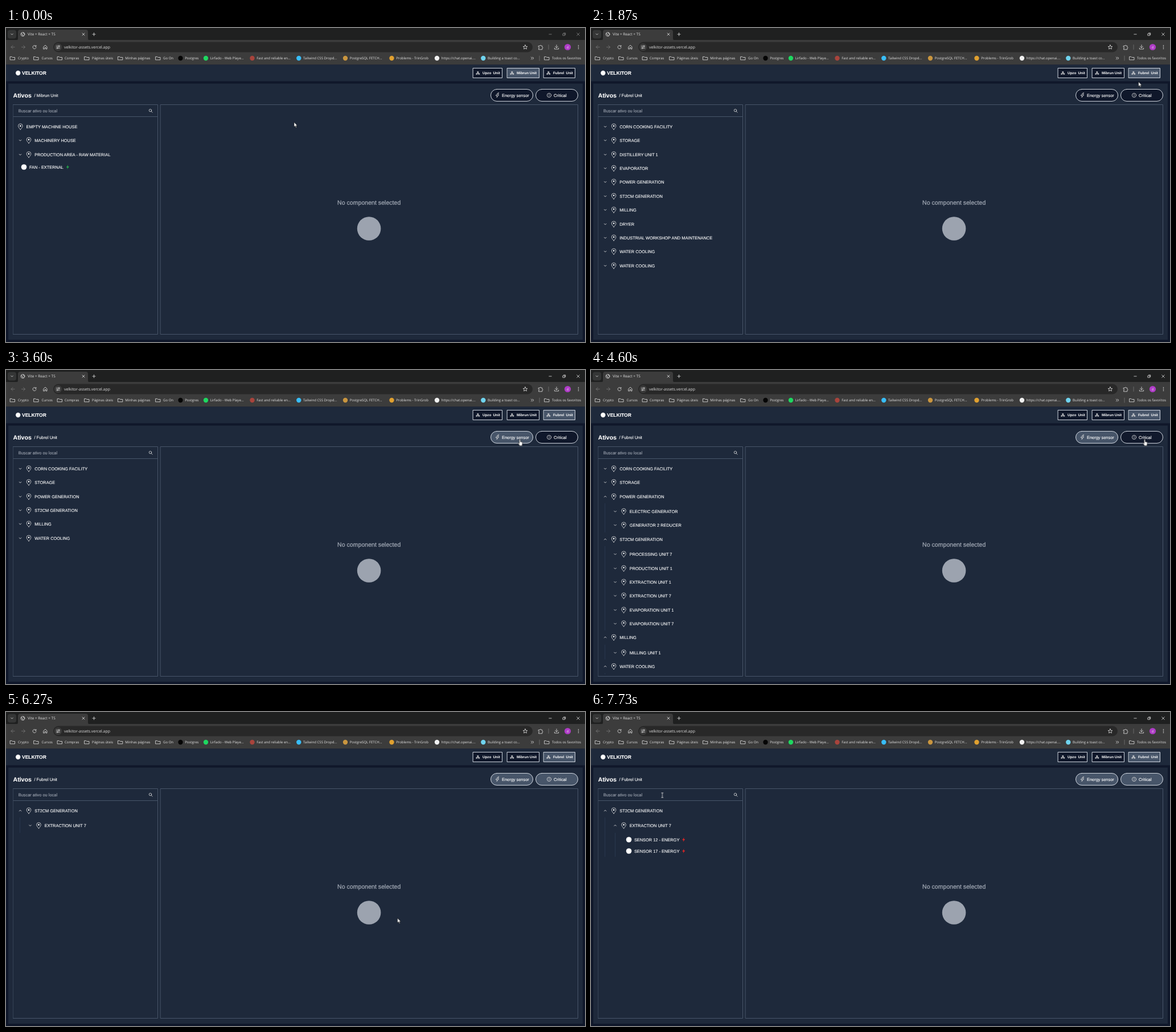
An HTML page for the animation above (8000 ms loop, 1017 by 551 pixels).

```html
<!DOCTYPE html>
<html lang="pt">
<head>
<meta charset="utf-8">
<title>Ativos</title>
<style>
html, body { margin: 0; width: 100%; height: 100%; overflow: hidden; background: #0f172a; }
.layer { position: absolute; left: 0; top: 0; width: 1017px; height: 551px; }
svg { display: block; fill: none; stroke-linecap: round; stroke-linejoin: round; }
text { fill: #fff; stroke: #fff; stroke-width: .12; font: 7.41px "Liberation Sans", Arial, sans-serif; white-space: pre; text-rendering: geometricPrecision; }
.chrome text { fill: #e3e3e3; stroke: none; font: 6.05px "Open Sans", "Noto Sans", sans-serif; }
.line { stroke: #e3e3e3; stroke-width: .8; }
.dim { stroke: #777; }
.soft .line { stroke: #8a8a8a; }
.muted { fill: #9ca3af; stroke: #9ca3af; }
.notice { font-size: 10.6px; stroke-width: .3; }
.nav text { font-weight: bold; font-size: 6.35px; stroke: none; }
.box { fill: #0f172a; stroke: #e2e8f0; stroke-width: .9; }
.frame { stroke: #475569; stroke-width: 1; }
.tree { position: absolute; left: 0; top: 161.1px; width: 266px; height: 376px; overflow: hidden; }
.row { width: 266px; overflow: visible; }
.kids { display: grid; grid-template-rows: 0fr; }
.kids > div { position: relative; overflow: hidden; min-height: 0; }
.kids > div::before { content: ""; display: block; height: 2px; }
.kids > div::after { content: ""; position: absolute; left: var(--x); top: 0; bottom: 0; width: 1px; background: #29374d; }
</style>
</head>
<body>
<script>
const LOOP = 8000, DARK = '#0f172a', LIT = '#475569';
let css = '';

// Each step is [ms, declarations, easing]; a few ms early so rounding never shows a late change.
function keyframes(name, steps) {
  const all = [...steps, [LOOP + 5, steps.at(-1)[1]]];
  css += `@keyframes ${name}{` + all.map(([ms, rule, ease = 'linear']) =>
    `${ms ? (ms - 5) / LOOP * 100 : 0}%{${rule};animation-timing-function:${ease}}`).join('') + '}';
}
const run = name => `style="animation:${name} ${LOOP}ms infinite"`;
const show = (name, ...steps) =>
  keyframes(name, steps.map(([ms, on]) => [ms, `opacity:${on}`, 'step-end']));
const fade = (name, start, end, from, to) =>
  keyframes(name, [[0, `fill:${from}`], [start, `fill:${from}`], [end, `fill:${to}`]]);
function accordion(name, start) {
  const end = start + 200;
  keyframes(name, [[0, 'grid-template-rows:0fr'], [start, 'grid-template-rows:0fr', 'ease-out'], [end, 'grid-template-rows:1fr']]);
  keyframes(name + 'Turn', [[0, 'transform:rotate(0deg)'], [start, 'transform:rotate(0deg)', 'ease-out'], [end, 'transform:rotate(180deg)']]);
}

const at = (x, y, body) => `<g transform="translate(${x},${y})">${body}</g>`;
const text = (x, y, label, attrs = '') => `<text x="${x}" y="${y}" ${attrs}>${label}</text>`;
const rect = (x, y, w, h, attrs) => `<rect x="${x}" y="${y}" width="${w}" height="${h}" ${attrs}/>`;
const dot = (x, y, r, fill) => `<circle cx="${x}" cy="${y}" r="${r}" fill="${fill}"/>`;
const line = (x, y, d, cls = '') => `<path class="line ${cls}" transform="translate(${x},${y})" d="${d}"/>`;
const ring = (x, y, r) => `<circle class="line" cx="${x}" cy="${y}" r="${r}"/>`;
const layer = (body, cls = '') => `<svg class="layer ${cls}" viewBox="0 0 1017 551">${body}</svg>`;

// Browser window
const folder = (x, label, gap = 9.5) =>
  line(x, 53, 'M-4-2.6H-1.2L-.2-1.5H4V2.9H-4Z') + text(x + gap, 55.2, label);
const bookmark = (x, color, label) => dot(x, 53, 4.2, color) + text(x + 7.7, 55.2, label);
const windowButtons =
  line(956, 11, 'M-2.2 0H2.2') + line(980.5, 11, 'M-2.2-1H1V2.2H-2.2ZM-1-2.2H2.2V1') +
  line(1005, 11, 'M-2.3-2.3L2.3 2.3M2.3-2.3L-2.3 2.3');
show('blurred', [0, 1], [1530, 0]);
show('focused', [0, 0], [1530, 1]);

const browser = [
  rect(0, 0, 1017, 22, 'fill="#1f2020"'), rect(0, 21, 1017, 43.5, 'fill="#3c3c3c"'),
  rect(3, 3.5, 15, 15, 'rx="4" fill="#353636"'), line(10.5, 11, 'M-1.8-.9L0 .9 1.8-.9'),
  '<path d="M18 21.5Q21 21.5 21 18V7Q21 3 25 3H140Q144 3 144 7V18Q144 21.5 147 21.5Z" fill="#3c3c3c"/>',
  ring(29.5, 11, 3.4), line(29.5, 11, 'M-3-1Q0-1-.3 1T1 3M1-3Q0-1 3 0'),
  text(38, 13.3, 'Vite + React + TS', 'style="font-size:6.4px"'),
  line(136, 11, 'M-2-2L2 2M2-2L-2 2'), line(154.5, 11, 'M-2.6 0H2.6M0-2.6V2.6'),
  `<g class="soft" ${run('blurred')}>${windowButtons}</g>`,
  `<g ${run('focused')}>${windowButtons}</g>`,
  line(12, 33.5, 'M3 0H-3M0-3L-3 0 0 3', 'dim'), line(30.5, 33.5, 'M-3 0H3M0-3L3 0 0 3', 'dim'),
  line(50, 33.5, 'M2.4-1.8A3 3 0 1 0 3 .6M2.9-3V-1.2H1'),
  line(69, 33.5, 'M-3-.6L0-3.4 3-.6V3.4H1V.8H-1V3.4H-3Z'),
  rect(83, 24.5, 842, 18, 'rx="9" fill="#282828"'), dot(91.5, 33.5, 6.6, '#3c3c3c'),
  line(91.5, 33.5, 'M-3-1.6H0M3 1.6H0'), ring(93, 31.9, 1.1), ring(90, 35.1, 1.1),
  text(102, 35.9, 'velkitor-assets.vercel.app', 'style="font-size:6.9px"'),
  line(912, 33.5, 'M0-3.8L1.1-1.2 3.8-1 1.8.8 2.4 3.5 0 2-2.4 3.5-1.8.8-3.8-1-1.1-1.2Z'),
  line(939, 34, 'M-3.4-2.6H-1A1.1 1.1 0 0 1 1.2-2.6H2.8V-.4A1.1 1.1 0 0 1 2.8 1.8V3.8H-3.4V1.8A1.1 1.1 0 0 0-3.4-.4Z'),
  line(953, 33.5, 'M0-4V4', 'dim'), line(967, 33.5, 'M0-3.8V1.2M-2.3-1L0 1.3 2.3-1M-3.6 1.6V3.5H3.6V1.6'),
  dot(986.5, 33.5, 5.6, '#b03cc8'), text(984.8, 35.6, 'd'),
  [-2.8, 0, 2.8].map(y => dot(1005.5, 33.5 + y, .8, '#e3e3e3')).join(''),
  folder(11.5, 'Crypto'), folder(53, 'Cursos'), folder(94.5, 'Compras', 8.5), folder(142, 'Páginas úteis', 9),
  folder(200.8, 'Minhas páginas', 8.5), folder(267, 'Go On', 9),
  bookmark(306.5, '#050505', 'Postgres'), bookmark(351, '#1ed760', 'Lirfado - Web Playe...'),
  bookmark(432.5, '#a8443c', 'Fast and reliable en...'), bookmark(514.3, '#38bdf8', 'Tailwind CSS Dropd...'),
  bookmark(596, '#c9953f', 'PostgreSQL FETCH...'), bookmark(677.5, '#e0a030', 'Problems - TrinGrob'),
  bookmark(757, '#f0f0f0', 'https://chat.openai....'), bookmark(838.3, '#6fd3ee', 'Building a toast co...'),
  line(924.5, 53, 'M-2.2-2L-.2 0-2.2 2M.4-2L2.4 0 .4 2'), line(937, 53, 'M0-4V4', 'dim'),
  folder(950, 'Todos os favoritos', 9)
].join('');

// Page
fade('oldUnit', 1505, 1640, LIT, DARK);
fade('newUnit', 1130, 1205, DARK, LIT);
fade('energy', 2130, 2280, DARK, LIT);
fade('critical', 4600, 4760, DARK, LIT);
show('oldTitle', [0, 1], [1530, 0]);
show('newTitle', [0, 0], [1530, 1]);

const unit = (x, w, name, unitX, anim) =>
  rect(x, 70.5, w, 17, `class="box" ${anim ? run(anim) : ''}`) +
  line(x + 8.5, 79, 'M-.8-2.4H.8V-1H-.8ZM0-1V.2M-2 1V.2H2V1M-2.8 1H-1.2V2.3H-2.8ZM1.2 1H2.8V2.3H1.2Z') +
  text(x + 16.4, 81.2, name) + text(unitX, 81.2, 'Unit');
const pill = (x, anim) => rect(x, 107.5, 74, 21, `rx="10.5" class="box" ${run(anim)}`);

const page = [
  rect(0, 64.5, 1017, 29, 'fill="#1e293b"'), rect(4, 97.5, 1009, 449.5, 'fill="#1e293b"'),
  dot(21.2, 79, 4.2, '#fff'), text(28, 82, 'VELKITOR', 'style="font-weight:bold;font-size:8.5px"'),
  `<g class="nav">${unit(820.5, 51, 'Upzo', 855.5)}${unit(880.5, 56, 'Mibrun', 919.8, 'oldUnit')}${unit(944.5, 55, 'Fubrel', 983.6, 'newUnit')}</g>`,
  text(12.5, 121.9, 'Ativos', 'style="font-weight:bold;font-size:10.6px"'),
  text(49.5, 120.8, '/ Mibrun Unit', run('oldTitle')), text(49.5, 120.8, '/ Fubrel Unit', run('newTitle')),
  pill(851.5, 'energy'), line(863, 118, 'M.8-3.8L-2.8.6H-.3L-1 3.8 2.8-.8H.2L2.6-3.8Z'), text(871, 120.8, 'Energy sensor'),
  pill(930.5, 'critical'), ring(954, 118, 3.6), line(954, 118, 'M0-1.8V.4M0 1.7V1.8'), text(962, 120.8, 'Critical'),
  rect(12.5, 134.5, 254, 403, 'class="frame"'), rect(271.5, 134.5, 733, 403, 'class="frame"'),
  '<path class="frame" d="M13 155.5H266"/>',
  text(21.7, 147.8, 'Buscar ativo ou local', 'class="muted"'),
  ring(253.5, 144.6, 2.2), line(253.5, 144.6, 'M1.7 1.7L3.6 3.6'),
  text(582, 309.8, 'No component selected', 'class="muted notice"'),
  dot(637.6, 352, 20.8, '#9ca3af')
].join('');

// Asset tree: every node is a function of its depth
const INDENT = 17.5;
const row = (height, body) => `<svg class="row" height="${height}">${at(0, height / 2, body)}</svg>`;
const pin = '<path class="line" d="M0 5C-2 2.6-3.8.8-3.8-1.3A3.8 3.8 0 0 1 3.8-1.3C3.8.8 2 2.6 0 5Z"/>' + dot(0, -1.3, 1.3, '#fff');
const marker = (x, label) => at(x, 0, pin) + text(x + 10.2, 2.6, label);
const emptyPlace = label => () => row(24.35, marker(25.3, label));
const place = (label, open, kids = []) => depth => {
  const x = 25 + INDENT * depth;
  const chevron = `<path class="line" d="M-1.9-.9L0 1 1.9-.9" ${open ? run(open + 'Turn') : ''}/>`;
  const list = open ? `<div class="kids" ${run(open)}><div style="--x:${x - 1}px">${kids.map(k => k(depth + 1)).join('')}</div></div>` : '';
  return row(24.35, at(x, 0, chevron) + marker(x + 15, label)) + list;
};
const sensor = (label, width, color) => depth => row(20,
  at(31.5 + INDENT * depth, 0, dot(0, 0, 4.8, '#fff') + text(9.4, 2.6, label) +
    `<path transform="translate(${width + 16.2},0)" d="M.8-3.9L-2.6.7H-.4L-1 3.9 2.6-.9H.3Z" fill="${color}"/>`));
const tree = (name, nodes) => `<div class="tree" ${run(name)}>${nodes.map(n => n(0)).join('')}</div>`;
const places = (...labels) => labels.map(label => place(label));
const unit7 = open => place('EXTRACTION UNIT 7', open,
  [12, 17].map(n => sensor(`SENSOR ${n} - ENERGY`, 80, '#dc2626')));

show('firstTree', [0, 1], [1530, 0]);
show('fullTree', [0, 0], [1870, 1], [3600, 0]);
show('energyTree', [0, 0], [3600, 1], [5600, 0]);
show('criticalTree', [0, 0], [5600, 1]);
accordion('energyOpen', 4040);
accordion('energyDeep', 4640);
accordion('criticalOpen', 6040);
accordion('criticalDeep', 6640);

const trees = [
  tree('firstTree', [emptyPlace('EMPTY MACHINE HOUSE'), ...places('MACHINERY HOUSE', 'PRODUCTION AREA - RAW MATERIAL'),
    sensor('FAN - EXTERNAL', 60.6, '#22a34a')]),
  tree('fullTree', places('CORN COOKING FACILITY', 'STORAGE', 'DISTILLERY UNIT 1', 'EVAPORATOR', 'POWER GENERATION',
    'ST2CM GENERATION', 'MILLING', 'DRYER', 'INDUSTRIAL WORKSHOP AND MAINTENANCE', 'WATER COOLING', 'WATER COOLING')),
  tree('energyTree', [
    ...places('CORN COOKING FACILITY', 'STORAGE'),
    place('POWER GENERATION', 'energyOpen', places('ELECTRIC GENERATOR', 'GENERATOR 2 REDUCER')),
    place('ST2CM GENERATION', 'energyOpen', [...places('PROCESSING UNIT 7', 'PRODUCTION UNIT 1', 'EXTRACTION UNIT 1'),
      unit7('energyDeep'), ...places('EVAPORATION UNIT 1', 'EVAPORATION UNIT 7')]),
    place('MILLING', 'energyOpen', places('MILLING UNIT 1')),
    place('WATER COOLING', 'energyOpen')]),
  tree('criticalTree', [place('ST2CM GENERATION', 'criticalOpen', [unit7('criticalDeep')])])
].join('');

// Pointer: [ms, x, y, jumps until the next point]
keyframes('pointer', [
  [0, 506, 165.5, 1], [70, 512, 159, 1], [130, 517.5, 162, 1],
  [463, 517.5, 162, 4], [730, 1013, 98, 1], [863, 1013, 98, 5], [1200, 995.5, 79, 1],
  [1600, 995.5, 79, 11], [2330, 902.5, 121.5, 1],
  [4403, 902.5, 121.5, 3], [4600, 972.5, 121.5, 1],
  [5733, 972.5, 121.5, 5], [6067, 810, 270, 5], [6400, 606, 423, 7], [6870, 573, 404.5, 1],
  [7003, 573, 404.5, 11], [7730, 125.3, 146, 1]
].map(([ms, x, y, n]) => [ms, `transform:translate(${x}px,${y}px)`, `steps(${n})`]));
show('arrow', [0, 1], [1130, 0], [1730, 1], [2130, 0], [5800, 1], [7730, 0]);
show('hand', [0, 0], [1130, 1], [1730, 0], [2130, 1], [5800, 0]);
show('beam', [0, 0], [7730, 1]);

const shape = (name, d) => `<path d="${d}" fill="#fff" stroke="#111" stroke-width=".6" ${run(name)}/>`;
const pointer = `<g ${run('pointer')}>` +
  shape('arrow', 'M0 0V8L1.9 6.3 3.2 9.3 4.5 8.7 3.2 5.9H5.7Z') +
  shape('hand', 'M-1 1A1 1 0 0 1 1 1V4.4L3.8 5Q4.9 5.3 4.8 6.5L4.1 9.6V11.4H-.8V10L-3 7.2Q-2.9 5.9-1.8 6.5L-1 7.2Z') +
  `<path class="line" d="M-1.5-4H1.5M0-4V4M-1.5 4H1.5" ${run('beam')}/></g>`;

document.body.innerHTML = `<style>${css}</style>` + layer(browser, 'chrome') + layer(page) + trees + layer(pointer);
</script>
</body>
</html>
```
